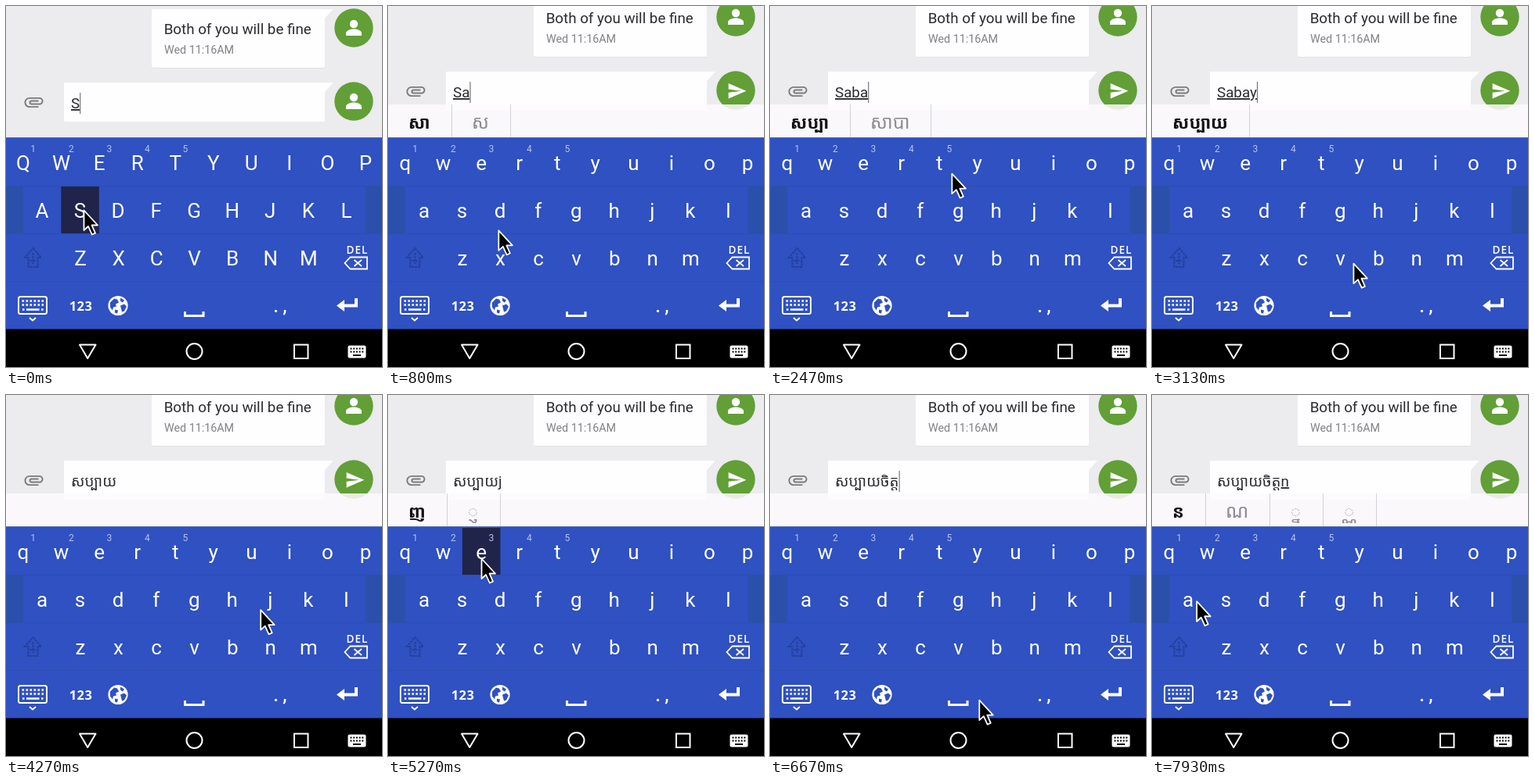
Recreate the animation shown at these times as an HTML page. Size 480 px wide and 462 px high, loop 8 s.

```html
<!DOCTYPE html>
<html lang="en">
<head>
<meta charset="utf-8">
<title>Phonetic Khmer typing</title>
<style>
  html, body { margin: 0; width: 100%; height: 100%; overflow: hidden; background: #ecebed; }
  svg { display: block; width: 480px; height: 462px; stroke-width: 2; }
  text { font-family: Roboto, "Noto Sans Khmer", "Noto Sans", sans-serif; }
  .key { font-size: 26px; fill: #fff; text-anchor: middle; }
  .mark { font-size: 24px; font-weight: 500; }
  .hint { font-size: 12px; fill: #b6c3ec; text-anchor: middle; }
  .label { font-family: "Open Sans", sans-serif; fill: #fff; text-anchor: middle; }
  .word { font-size: 23.6px; fill: #8d8b8f; }
  .word.best { font-size: 22px; font-weight: 700; fill: #111; }
  .line { fill: none; stroke: #fff; }
</style>
</head>
<body>
<svg viewBox="0 0 480 462" xmlns="http://www.w3.org/2000/svg">
  <defs>
    <g id="person" fill="#fff">
      <circle cy="-5" r="5.2"/>
      <path d="M-10 10V7C-10 3-4 1.5 0 1.5S10 3 10 7V10Z"/>
    </g>
  </defs>

  <rect width="480" height="170" fill="#ecebed"/>
  <g id="chat">
    <path d="M186 4H418L407 16V77Q407 79 405 79H188Q186 79 186 77Z" fill="#dedde0" transform="translate(0 .7)"/>
    <path d="M186 4H418L407 16V77Q407 79 405 79H188Q186 79 186 77Z" fill="#fefdff"/>
    <text x="201.7" y="35.5" font-size="18.75" fill="#2b2a2c">Both of you will be fine</text>
    <text x="202" y="61" font-size="14.3" fill="#828184">Wed 11:16AM</text>
    <circle cx="444" cy="28" r="24.7" fill="#629f37"/>
    <use href="#person" x="444" y="28"/>

    <path d="M74 98H418L407 110V146Q407 148 405 148H76Q74 148 74 146Z" fill="#fefdff"/>
    <path transform="translate(21.1 108.5) scale(1.2)" fill="#7b7a7d" d="M2 12.5C2 9.46 4.46 7 7.5 7H18c2.2 0 4 1.8 4 4s-1.8 4-4 4H9.5C8.1 15 7 13.9 7 12.5S8.1 10 9.5 10H17v1.6H9.5c-1 0-1 1.8 0 1.8H18c1.3 0 2.4-1.1 2.4-2.4S19.3 8.6 18 8.6H7.5C5.3 8.6 3.6 10.4 3.6 12.5S5.3 16.4 7.5 16.4H17V18H7.5C4.46 18 2 15.54 2 12.5z"/>
    <circle cx="444" cy="122" r="24.7" fill="#629f37"/>
    <use id="avatar" href="#person" x="444" y="122"/>
    <path id="send" transform="translate(432.5 109.7) scale(1.08)" fill="#fff" d="M2 21L23 12 2 3V10L17 12 2 14Z"/>
    <text id="field" x="83" y="131" font-size="18.8" fill="#2b2a2c"><tspan></tspan><tspan text-decoration="underline"></tspan></text>
    <rect id="caret" y="111" width="1.2" height="27" fill="#777"/>
  </g>

  <g id="bar">
    <rect y="126" width="480" height="43" fill="#fdfbfe" fill-opacity=".85"/>
    <g id="words"></g>
  </g>

  <rect y="169" width="480" height="245" fill="#2f51c1"/>
  <rect y="168" width="480" height="1" fill="#5a70b4"/>
  <path d="M0 230.5H480M0 291.5H480M0 352.5H480" stroke="#2c4cb7" stroke-width="1"/>
  <path d="M0 230H22V292H0ZM459 230H480V292H459Z" fill="#2b50ac"/>
  <rect id="press" fill="#20244a"/>
  <g id="keys"></g>

  <path d="M34.5 310L45 322H40.500V334H28.500V322H24ZM34.500 316V330M30.500 326H38.500" fill="none" stroke="#233f9d" stroke-dasharray="3 1"/>
  <text class="label" x="448.5" y="317" font-size="13.5" font-weight="600" letter-spacing="1">DEL</text>
  <path class="line" d="M432.5 329L439.5 321.5H461V336.5H439.5ZM444.5 325L454 333M454 325L444.5 333" stroke-width="1.8"/>

  <rect class="line" x="16" y="372" width="36" height="22" rx="2.5"/>
  <path class="line" d="M20.5 377.5H48M20.5 382.5H48" stroke-width="2.6" stroke-dasharray="2.6 2.4"/>
  <path class="line" d="M21 388.5H23.5M26 388.5H42.5M45 388.5H47.5" stroke-width="2.6"/>
  <path class="line" d="M30 399L34 402.5 38 399"/>
  <text class="label" x="95.5" y="390" font-size="16.5" font-weight="700" letter-spacing=".4">123</text>
  <g transform="translate(143 383.5)">
    <circle r="12.6" fill="#fff"/>
    <path d="M-10-4L-5-9-1-8 1-4-3-2-2 1-6 2-7 6-10 2ZM3-10L8-7 6-4 3-6ZM3 0L8-2 11 1 8 7 5 8 4 4ZM-4 5L0 6-1 10-4 9Z" fill="#2f51c1"/>
  </g>
  <path class="line" d="M228.5 391V396.5H252V391" stroke-width="3"/>
  <text class="key mark" x="344.5" y="392">.</text>
  <text class="key mark" x="356" y="392">,</text>
  <path class="line" d="M447 374V383.5H429" stroke-width="4"/>
  <path d="M422 383.5L432 376V391Z" fill="#fff"/>

  <rect y="413.5" width="480" height="48.5" fill="#000"/>
  <path class="line" d="M94 433.5H114.5L104.2 451Z" stroke-linejoin="round"/>
  <circle class="line" cx="240.5" cy="442" r="10"/>
  <rect class="line" x="368" y="433.5" width="17.5" height="17.5"/>
  <rect x="436.5" y="434.5" width="23" height="16" rx="2" fill="#fff"/>
  <path d="M439.5 438.5H457M439.5 442.5H457" stroke="#000" stroke-dasharray="2 1.7"/>
  <path d="M443 447H453" stroke="#000"/>

  <path id="pointer" d="M1.5 2.5V28L7 23 11.8 33.5 16 31.7 11.5 21.5H19Z" fill="#000" stroke="#fff" stroke-width="1.8" stroke-linejoin="round"/>
</svg>

<script>
const LOOP = 8000, STEP = 200 / 3, PITCH = 48.55, SHIFT_AT = 190;
const $ = id => document.getElementById(id);

function add(parent, tag, attrs, text = "") {
  const node = document.createElementNS("http://www.w3.org/2000/svg", tag);
  for (const k in attrs) node.setAttribute(k, attrs[k]);
  node.textContent = text;
  parent.append(node);
  return node;
}

// Keyboard letters, with the box that darkens when a key is held
const boxes = { " ": [168, 353, 145, 61] };
const letters = [];
[["qwertyuiop", 22, 170], ["asdfghjkl", 46, 231], ["zxcvbnm", 95, 292]]
  .forEach(([row, x0, top], r) => [...row].forEach((c, i) => {
    const x = x0 + i * PITCH;
    boxes[c] = [x - 24.2, top, 48.5, 60];
    letters.push([c, add($("keys"), "text", { class: "key", x, y: top + 39.8 })]);
    if (!r && i < 5) add($("keys"), "text", { class: "hint", x: x + 12.7, y: 187 }, i + 1);
  }));

// Key holds: from, to, key
const presses = [
  [0, 130, "s"], [430, 560, "a"], [1170, 1330, "b"], [1930, 2060, "a"], [2600, 2740, "y"],
  [3310, 3420, " "], [4400, 4500, "j"], [5190, 5330, "e"], [5750, 5880, "t"],
  [6330, 6460, " "], [7200, 7330, "n"]
];

// Field contents: time, committed text, composing text, suggestions
const HAPPY = "សប្បាយ", HEART = "ចិត្ត";
const states = [
  [-70, "", "S", "ស សា"],
  [560, "", "Sa", "សា ស"],
  [1330, "", "Sab", "សព្វ សាប សាប់ សាព"],
  [2060, "", "Saba", "សប្បា សាបា"],
  [2740, "", "Sabay", HAPPY],
  [3420, HAPPY, "", ""],
  [4500, HAPPY, "j", "ញ ◌្ញ"],
  [5330, HAPPY, "je", "ចេ ជេ"],
  [5880, HAPPY, "jet", HEART],
  [6460, HAPPY + HEART, "", ""],
  [7330, HAPPY + HEART, "n", "ន ណ ◌្ន ◌្ណ"]
];

// Pointer tip: time, x, y
const path = [
  [0, 98, 259], [130, 98, 259], [420, 48, 263], [560, 48, 263], [1130, 288, 320], [1330, 288, 320],
  [1800, 67, 275], [1930, 47, 263], [2060, 47, 263], [2600, 264, 203], [2740, 264, 203],
  [3130, 256, 326], [3310, 248, 390], [3420, 250, 400], [3490, 256, 427], [3600, 264, 412],
  [4270, 324, 272], [4400, 336, 264], [4500, 336, 264], [4740, 300, 358], [5200, 118, 207],
  [5330, 118, 207], [5750, 214, 205], [5880, 214, 205], [6330, 247, 385], [6460, 250, 386],
  [6670, 266, 388], [6930, 278, 374], [7200, 336, 322], [7330, 336, 322], [7930, 57, 262], [8000, 50, 262]
];

const same = (a, b) => a[1] === b[1] && a[2] === b[2];

function slope(i, axis) {
  const a = path[i - 1], p = path[i], b = path[i + 1];
  if (!a || !b || same(a, p) || same(p, b)) return 0;
  return (b[axis] - a[axis]) / (b[0] - a[0]);
}

// Cubic Hermite through the points, at rest around every hold
function pointerAt(t) {
  let i = 0;
  while (i < path.length - 2 && t >= path[i + 1][0]) i++;
  const a = path[i], b = path[i + 1], d = b[0] - a[0], u = (t - a[0]) / d;
  const s = u * u * (3 - 2 * u), v = 1 - u;
  return [1, 2].map(k => a[k] + (b[k] - a[k]) * s
    + d * u * v * (slope(i, k) * v - slope(i + 1, k) * u));
}

const show = (node, on) => node.setAttribute("visibility", on ? "visible" : "hidden");

function setWords(list) {
  const box = $("words");
  box.replaceChildren();
  let x = 0;
  list.split(" ").filter(Boolean).forEach((w, i) => {
    const word = add(box, "text", { class: i ? "word" : "word best", x: x + 26, y: 157 }, w);
    x += Math.round(word.getComputedTextLength() + 53);
    add(box, "rect", { x, y: 126, width: 1, height: 42, fill: "#d3d1d5" });
  });
}

let shownState, shownCase;

function draw(t) {
  const small = t >= SHIFT_AT;
  if (small !== shownCase) {
    shownCase = small;
    for (const [c, node] of letters) node.textContent = small ? c : c.toUpperCase();
    $("chat").setAttribute("transform", `translate(0 ${small ? -14 : 0})`);
    show($("bar"), small);
    show($("send"), small);
    show($("avatar"), !small);
  }

  const state = states.findLast(s => s[0] <= t);
  if (state !== shownState) {
    shownState = state;
    const [done, typing] = $("field").children;
    done.textContent = state[1];
    typing.textContent = state[2];
    setWords(state[3]);
    $("caret").setAttribute("x", 83 + $("field").getComputedTextLength());
  }
  show($("caret"), (t - state[0]) % 1000 < 500);

  const held = presses.find(p => t >= p[0] && t < p[1]);
  show($("press"), held);
  if (held) ["x", "y", "width", "height"].forEach((k, i) => $("press").setAttribute(k, boxes[held[2]][i]));

  $("pointer").setAttribute("transform", `translate(${pointerAt(t)})`);
}

const start = performance.now();
function tick() {
  const t = (performance.now() - start) % LOOP;
  draw(Math.floor(t / STEP + 0.1) * STEP);
  requestAnimationFrame(tick);
}
tick();
</script>
</body>
</html>
```
